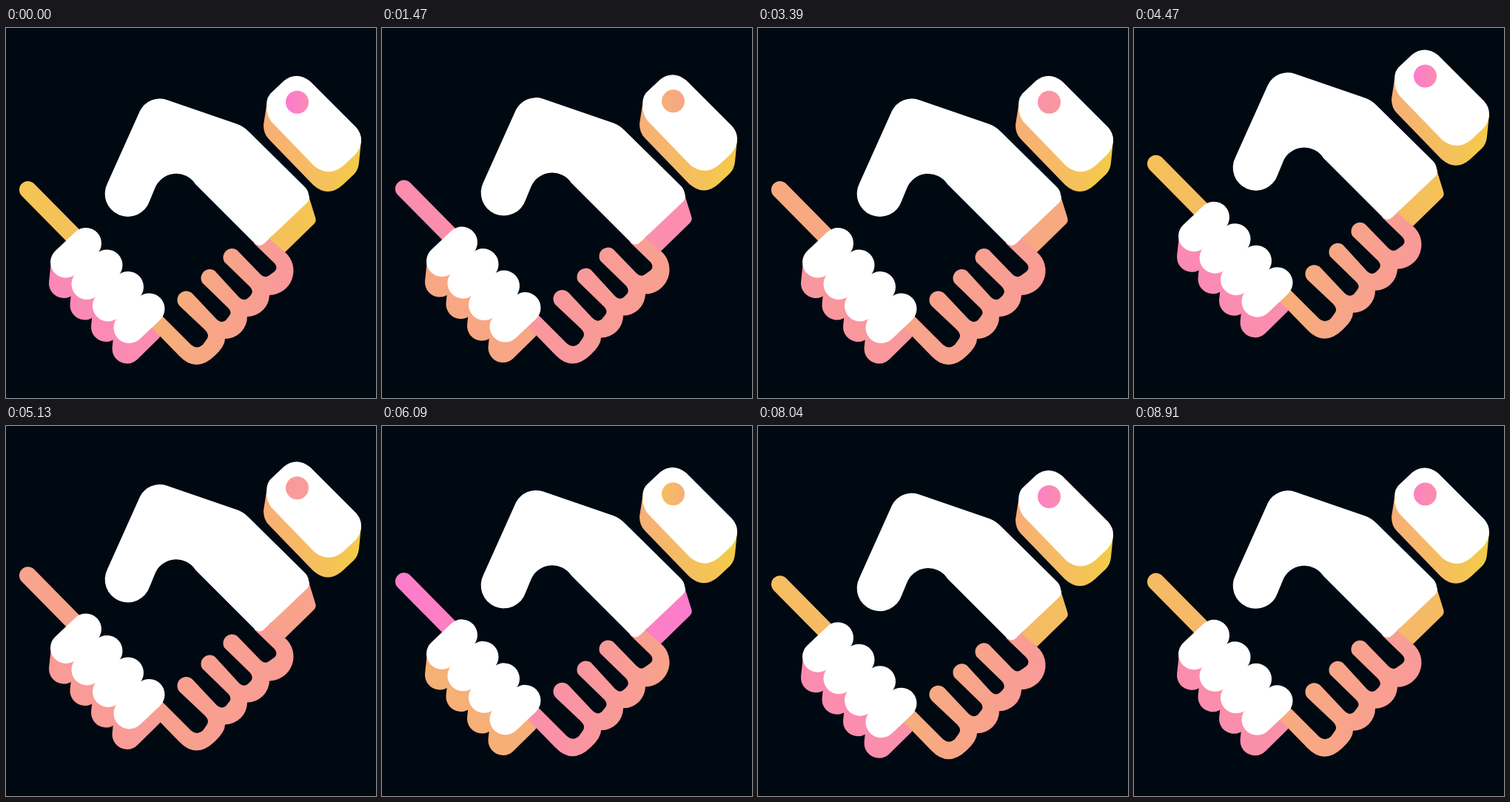
These frames come from a looping animation (500x500 px, 8940 ms). An HTML page with a canvas:

```html
<!DOCTYPE html>
<html lang="en">
<head>
<meta charset="utf-8">
<title>Handshake</title>
<style>
  html, body { margin: 0; width: 100%; height: 100%; overflow: hidden; background: #000912; }
  canvas { display: block; width: 500px; height: 500px; }
</style>
</head>
<body>
<canvas id="stage" width="500" height="500"></canvas>
<script>
const ctx = document.getElementById('stage').getContext('2d');

const LOOP = 8940;
const CYCLE = 4245;
const CYCLE_START = 1230;
const LIFT = 36;
// Two rounds of shakes per cycle
const ROUNDS = [
  { start: 209, count: 4, period: 485 },
  { start: 2505, count: 3, period: 505 }
];

const PINK = [254, 112, 222];
const YELLOW = [243, 204, 72];

const hand = new Path2D(`M181 112 A30 30 0 0 1 217 97 L313 130 Q321 133 328 140
  L404 215 Q408 219 409 225 L410 229 Q410 233 407 236 L349 291 Q343 297 336 291
  L256 211 A31 31 0 0 0 201 217 L194 234 A31 31 0 1 1 137 210 Z`);

const sleeve = new Path2D('M350 291 L409 227 L418 256 Q420 261 416 265 L377 303 L350 285 Z');

const fingers = new Path2D(`M196 404 L234 443 Q257 467 282 443 Q296 430 296 420
  A30 30 0 0 0 326 390 A30 30 0 0 0 356 361 A33 33 0 0 0 377 303 L355 284 L335 291
  L363 318 Q368 324 363 329 L356 334 Q350 339 344 333 L312 300 A12 12 0 0 0 295 316
  L330 350 Q335 356 331 361 L327 365 Q321 370 315 364 L282 328 A12 12 0 0 0 265 344
  L301 379 Q306 385 301 390 L297 395 Q291 400 284 393 L252 359 A12 12 0 0 0 235 376
  L269 408 Q276 415 271 421 L266 428 Q258 435 250 428 L211 389 Z`);

const cuffTop = new Path2D(`M352 105 Q352 92 360 86 L376 71 Q393 58 411 72 L473 134
  Q480 142 480 151 Q480 162 472 171 L456 186 Q437 202 417 187 L359 127 Q352 118 352 105 Z`);

const cuffSide = new Path2D(`M352 105 L348 131 Q348 143 355 150 L415 212 Q435 230 455 212
  L470 198 Q476 192 477 182 L480 152 Z`);

const dot = new Path2D();
dot.arc(393.5, 100.3, 15.5, 0, 2 * Math.PI);

function ramp(u) {
  const mixed = PINK.map((p, i) => Math.round(p + (YELLOW[i] - p) * u));
  return `rgb(${mixed})`;
}

function gradient(x0, x1, u0, u1) {
  const g = ctx.createLinearGradient(x0, 0, x1, 0);
  g.addColorStop(0, ramp(u0));
  g.addColorStop(1, ramp(u1));
  return g;
}

function line(width, style, ...points) {
  ctx.lineWidth = width;
  ctx.strokeStyle = style;
  ctx.beginPath();
  points.forEach(([x, y]) => ctx.lineTo(x, y));
  ctx.stroke();
}

function fill(path, style) {
  ctx.fillStyle = style;
  ctx.fill(path);
}

function lift(time) {
  for (const { start, count, period } of ROUNDS) {
    const beat = (time - start) / period;
    if (beat > 0 && beat < count) return LIFT * (1 - Math.cos(2 * Math.PI * beat)) / 2;
  }
  return 0;
}

function draw(now) {
  const time = (now % LOOP - CYCLE_START + CYCLE) % CYCLE;
  const mood = Math.sin(2 * Math.PI * (Math.min(time, 4060) + 60) / 4040);
  const tint = (x0, x1, k0, k1) => gradient(x0, x1, 0.5 + mood * k0, 0.5 + mood * k1);

  ctx.setTransform(1, 0, 0, 1, 0, 0);
  ctx.fillStyle = '#000912';
  ctx.fillRect(0, 0, 500, 500);
  ctx.translate(0, -lift(time));
  ctx.lineCap = ctx.lineJoin = 'round';

  line(23.5, tint(18, 110, -0.43, -0.36), [29.7, 218.7], [108, 298]);

  const knuckles = [0, 1, 2, 3].map(i => [81 + 28.5 * i, 316.5 + 29.5 * i]);
  const side = tint(58, 208, 0.24, 0.2);
  for (const [x, y] of knuckles) {
    line(40, side, [x, y], [x - 3, y + 28.5], [x + 26, y]);
  }

  fill(sleeve, tint(350, 418, -0.36, -0.44));
  fill(fingers, tint(200, 388, -0.2, 0.06));
  fill(hand, '#fff');
  for (const [x, y] of knuckles) line(42, '#fff', [x, y], [x + 27, y - 25.5]);

  fill(cuffSide, gradient(348, 480, 0.68, 1));
  fill(cuffTop, '#fff');
  fill(dot, tint(378, 409, 0.42, 0.2));
}

let origin;
function frame(now) {
  origin ??= now;
  draw(now - origin);
  requestAnimationFrame(frame);
}
draw(0);
requestAnimationFrame(frame);
</script>
</body>
</html>
```
